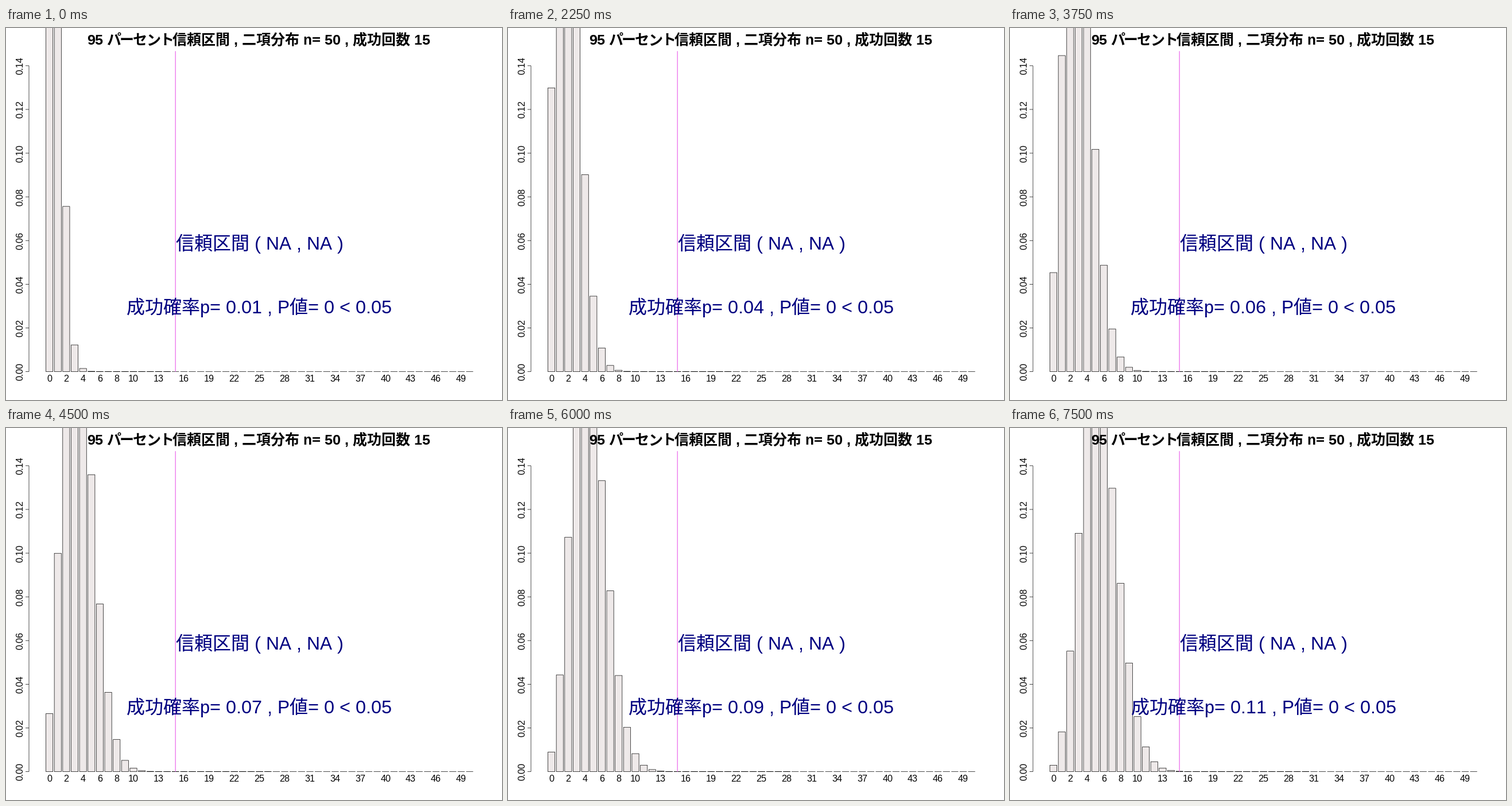
A matplotlib script that plays this animation: 864x648 px, repeating every 8 s.

```python
import math

import matplotlib.pyplot as plt
from matplotlib.animation import FuncAnimation
from matplotlib.patches import Rectangle

plt.rcParams["font.family"] = ["Liberation Sans", "Noto Sans CJK JP"]
plt.rcParams["text.hinting"] = "native"
plt.rcParams["text.hinting_factor"] = 1   # whole-pixel advances
plt.rcParams["text.kerning_factor"] = 6   # practically no kerning

W, H, DPI = 864, 648, 72
N, HITS = 50, 15
BASE, UNIT = 598.56, 3805.5       # zero line, pixels per unit of probability
LEFT, STEP, BAR = 69.5, 14.64, 12.2
THIN = 0.7
TICK_MS, HOLD = 250, 3            # each value of p lasts three ticks
FRAMES = 32

fig = plt.figure(figsize=(W / DPI, H / DPI), dpi=DPI, facecolor="white")
ax = fig.add_axes([0, 0, 1, 1])
ax.set(xlim=(0, W), ylim=(H, 0))
ax.axis("off")


def pmf(k, p):
    return math.comb(N, k) * p**k * (1 - p) ** (N - k)


def p_value(p):
    """Exact two-sided binomial test."""
    limit = pmf(HITS, p) * (1 + 1e-7)
    return sum(pmf(k, p) for k in range(N + 1) if pmf(k, p) <= limit)


def centre(k):
    return LEFT + k * STEP + BAR / 2


def line(xs, ys, color="black", width=THIN, z=2):
    ax.plot(xs, ys, color=color, lw=width, solid_capstyle="butt", snap=False, zorder=z)


def label(x, y, s, size, **kw):
    kw = {"ha": "center", "va": "baseline", "zorder": 5, **kw}
    return ax.text(x, y, s, fontsize=size, **kw)


def draw_axes():
    line([40, 40], [BASE, BASE - 0.14 * UNIT])
    for i in range(8):
        y = BASE - 0.02 * i * UNIT
        line([34, 40], [y, y])
        label(29, y, f"{0.02 * i:.2f}", 16, rotation=90, rotation_mode="anchor")
    for k in [*range(0, 10, 2), *range(10, N, 3)]:
        label(centre(k), 616, str(k), 16)


def draw_title():
    style = {"weight": "bold", "ha": "left"}
    label(141, 29, "95", 25, **style)
    for i, ch in enumerate("パーセント"):
        label(187.5 + 23 * i, 29, ch, 25, weight="bold")
    label(290, 29, f"信頼区間 , 二項分布 n= {N} , 成功回数 {HITS}", 25, **style)


draw_axes()
draw_title()
bars = [
    ax.add_patch(Rectangle((LEFT + k * STEP, BASE), BAR, 0, fc="#eee9e9",
                           ec="black", lw=THIN, snap=False, zorder=2))
    for k in range(N + 1)
]
line([centre(HITS)] * 2, [40.3, BASE], "violet", 1.5, 3)
label(441.5, 386, "信頼区間 ( NA , NA )", 32, color="navy")
status = label(441.5, 497, "", 32, color="navy")


def update(i):
    p = (i // HOLD + 1) / 100
    for k, bar in enumerate(bars):
        bar.set_height(-pmf(k, p) * UNIT)
    test = p_value(p)
    sign = "<" if test < 0.05 else ">="
    status.set_text(f"成功確率p= {p:g} , P値= {round(test, 2):g} {sign} 0.05")
    return [*bars, status]


anim = FuncAnimation(fig, update, frames=FRAMES, interval=TICK_MS,
                     repeat=True, repeat_delay=0, blit=False)
plt.show()
```
